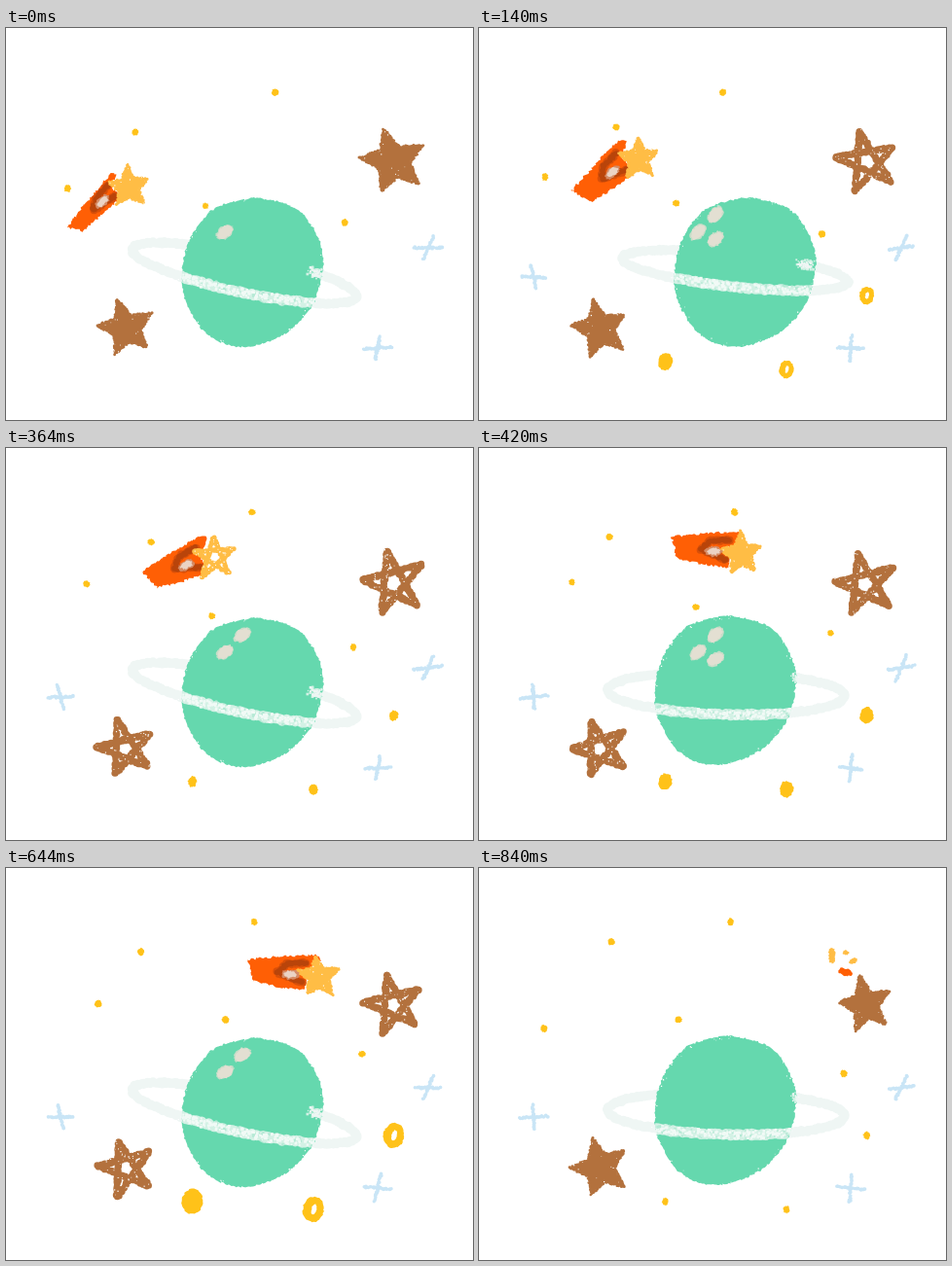
Animation of 480 by 403 pixels, one loop 980 ms. Source, as an HTML page with a canvas:

```html
<!DOCTYPE html>
<html lang="en">
<head>
<meta charset="utf-8">
<title>Crayon planet</title>
<style>
html, body { margin: 0; width: 100%; height: 100%; overflow: hidden; background: #fff; }
canvas { display: block; width: 480px; height: 403px; }
</style>
</head>
<body>
<canvas id="stage" width="480" height="403"></canvas>
<script>
const ctx = document.getElementById('stage').getContext('2d');
const STEP = 140, COUNT = 7;
const { sin, cos, abs, min, max, PI } = Math;
const MINT = '#65d8ae', RING = '#eff6f4', BROWN = '#b3713d', GOLD = '#ffc219',
      SKY = '#c9e5f6', FLAME = '#ff5f05', EMBER = '#b9440a', STAR = '#ffbd45', PALE = '#e3dfd2';

// Planet outline, shifted per pose; each ring is a tilted ellipse
const BODY = [[262,175], [297,185], [316,206], [326,235], [321,270], [308,295], [282,317],
              [243,328], [208,316], [185,282], [181,248], [190,215], [211,188], [236,178]];
const POSES = [
  { dx: 0, dy: 0, ring: { x: 245, y: 252, rx: 118, ry: 20, tilt: 12 } },
  { dx: 20, dy: 0, ring: { x: 263, y: 249, rx: 117, ry: 17, tilt: 6 } },
  { dx: 0, dy: -2, ring: { x: 254, y: 252, rx: 122, ry: 22, tilt: 1.5 } }
];
const POSE_ORDER = [0, 1, 0, 2, 0, 1, 2];

const SHINE_SPOTS = [[225,210], [243,192], [243,217]];
const SHINE_COUNT = [1, 3, 2, 3, 2, 1, 0];

// Small dots, each a path over the step number
const DOT_PATHS = [
  i => [257 + 20 * cos(i * 2 * PI / 3) * 0.65 ** i, 66 - max(0, 21 - 10.5 * abs(i - 5))],
  i => [141 + 9 * sin(i * 2 - 2), 107 - 5.2 * i],
  i => [80 - 17 * cos((i - 0.2) * PI / 3.25), 138 + 27 * cos(i * PI / 6) ** 4],
  i => [214 - 12 * cos((i - 0.7) * PI / 3), 168 + 15 * cos(i * PI / 5)],
  i => [348 + 4.5 * i, 200 + 12 * sin(i * 2 * PI / 4.6)]
];
const BLOB_SPOTS = [[398.5,275], [191.5,343], [316,351]];
const BLOB_SIZE = [0, 9, 5.5, 8.5, 13, 9.5, 4];

// x, y and lean of the upright stroke
const CROSSES = [[434,226,110], [382,329,100], [56,256,80]];
const COMET_PATH = [[126,164], [164,135], [214,113], [270,109], [321,112], [363,121]];

let seed = 1;
const rnd = () => (seed = seed * 16807 % 2147483647) / 2147483647;
const jit = a => (rnd() * 2 - 1) * a;
const mix = (a, b, t) => [a[0] + (b[0] - a[0]) * t, a[1] + (b[1] - a[1]) * t];
const polar = (x, y, r, deg) => [x + r * cos(deg * PI / 180), y + r * sin(deg * PI / 180)];

// Closed Catmull-Rom curve through the points
function smooth(pts) {
  const n = pts.length, out = [];
  for (let i = 0; i < n; i++) {
    const [a, b, c, d] = [n - 1, 0, 1, 2].map(k => pts[(i + k) % n]);
    for (let t = 0; t < 1; t += 0.125) {
      out.push([0, 1].map(k => b[k] + 0.5 * t * (c[k] - a[k] +
        t * (2 * a[k] - 5 * b[k] + 4 * c[k] - d[k] + t * (3 * (b[k] - c[k]) + d[k] - a[k])))));
    }
  }
  return out;
}

// Arc of a tilted ellipse, angles in degrees
function arc({ x, y, rx, ry, tilt }, from = 0, to = 360) {
  const c = cos(tilt * PI / 180), s = sin(tilt * PI / 180), out = [];
  for (let i = 0; i <= 32; i++) {
    const t = (from + (to - from) * i / 32) * PI / 180;
    const u = rx * cos(t), v = ry * sin(t);
    out.push([x + u * c - v * s, y + u * s + v * c]);
  }
  return out;
}

// Points along a polyline, about gap pixels apart
function walk(pts, gap) {
  const out = [];
  for (let i = 1; i < pts.length; i++) {
    const [a, b] = [pts[i - 1], pts[i]];
    const n = max(1, Math.round(Math.hypot(b[0] - a[0], b[1] - a[1]) / gap));
    for (let k = 0; k < n; k++) out.push(mix(a, b, k / n));
  }
  return [...out, pts[pts.length - 1]];
}

const close = pts => [...pts, pts[0]];

function rough(pts, color, wobble = 0.6) {
  ctx.fillStyle = color;
  ctx.beginPath();
  for (const [x, y] of walk(close(pts), 1.6)) ctx.lineTo(x + jit(wobble), y + jit(wobble));
  ctx.fill();
}

function crayon(pts, color, width, wobble = 0.7) {
  ctx.fillStyle = color;
  ctx.beginPath();
  for (const [x, y] of walk(pts, 1.2)) {
    const r = width / 2 * (0.85 + rnd() * 0.2), px = x + jit(wobble), py = y + jit(wobble);
    ctx.moveTo(px + r, py);
    ctx.arc(px, py, r, 0, 7);
  }
  ctx.fill();
}

// Small flecks scattered along a path
function flecks(pts, color, spread, count, size = 1) {
  const line = walk(pts, 1);
  ctx.fillStyle = color;
  for (let i = 0; i < count; i++) {
    const [x, y] = line[Math.floor(rnd() * line.length)];
    const s = size * (0.6 + rnd() * 0.7);
    ctx.fillRect(x + jit(spread) - s / 2, y + jit(spread) - s / 2, s, s);
  }
}

const blob = (x, y, rx, ry, tilt, color, wobble) => rough(arc({ x, y, rx, ry, tilt }), color, wobble);

// Hand-drawn five-pointed star, filled or as one looping line
function star(x, y, r, turn, color, solid, width) {
  const tips = [0, 1, 2, 3, 4].map(k => polar(x, y, r + jit(r * 0.07), turn - 90 + k * 72 + jit(4)));
  const line = [0, 2, 4, 1, 3, 0].map(k => tips[k]);
  if (solid) {
    const shape = tips.flatMap((p, k) => [p, mix([x, y], mix(p, tips[(k + 1) % 5], 0.5), 0.6)]);
    rough(shape, color, 0.9);
    crayon(close(shape), color, 3, 0.9);
  } else {
    crayon(line, color, width, 0.9);
  }
  flecks(line, '#fff', width / 2, solid ? r * 0.4 : r * 1.5);
}

function planet({ dx, dy, ring }) {
  const body = smooth(BODY.map(([x, y]) => [x + dx, y + dy]));
  const front = arc(ring, 20, 160), entry = arc(ring, -55, -48);
  crayon(arc(ring), RING, 10);
  rough(body, MINT, 0.9);
  flecks(close(body), '#fff', 3.5, 60);

  ctx.save();
  ctx.beginPath();
  body.forEach(p => ctx.lineTo(...p));
  ctx.clip();
  crayon(front, '#d3f1e5', 10.5, 1);
  flecks(front, '#b5e9d5', 4.6, 130, 2.2);
  flecks(front, '#f1faf6', 4, 300, 2.4);
  flecks(entry, '#d3f1e5', 5, 45, 2.2);
  flecks(entry, RING, 4, 30, 2.2);
  ctx.restore();
}

function shine(x, y) {
  const tilt = -38 + jit(12);
  blob(x, y, 10, 6.5, tilt, '#c8ddc8', 0.9);
  blob(x, y, 8.7, 5.5, tilt, PALE, 0.9);
}

function comet(i) {
  const [x, y] = COMET_PATH[i];
  const climb = max(0, 1 - i * i / 9);
  const size = i < 5 ? 1 : 0.62;
  const wide = min(36, 23 + 12 * i), shift = -4 - 7 * climb;
  const turn = (3 - 49 * climb) * PI / 180;
  // Along the flight, and across it as a share of the tail's width
  const place = ([u, v]) => {
    const a = u * size, b = (v * wide + shift) * size;
    return [x + a * cos(turn) - b * sin(turn), y + a * sin(turn) + b * cos(turn)];
  };
  const tail = [[-73,-0.28], [-40,-0.42], [-3,-0.52], [2,-0.36], [-12,0], [-13,0.52], [-42,0.46], [-66,0.32]];
  const ember = [[-13,-0.27], [-33,-0.22], [-42,0.04], [-16,0.3]].map(place);
  const glow = place([-29, 0.08]);
  rough(tail.map(place), FLAME, 1.3);
  crayon(ember, '#d94f08', 8 * size, 1);
  crayon(ember, EMBER, 5.5 * size, 1);
  star(x, y, 22 * size, -4, STAR, i !== 2, 5);
  const tilt = turn * 180 / PI;
  blob(...glow, 9 * size, 5 * size, tilt, '#d58a64', 1);
  blob(...glow, 6.5 * size, 3.5 * size, tilt, '#ebd3c4', 1);
}

// What is left once the comet has burst
function embers() {
  blob(363, 90, 3.6, 8, 0, STAR, 0.9);
  blob(377, 87, 3.2, 2.2, 15, STAR);
  blob(384.5, 95.5, 4.6, 2.8, -25, STAR);
  blob(376.5, 107, 7.5, 3.8, 15, FLAME, 0.8);
}

function cross([x, y, lean]) {
  for (const deg of [jit(9), lean + jit(7)]) {
    const half = 13.5 + jit(1.5);
    crayon([polar(x, y, -half, deg), polar(x, y, half, deg)], SKY, 3.8, 0.8);
  }
}

function dots(i) {
  for (const path of DOT_PATHS) blob(...path(i), 3.5 + jit(0.4), 3.5 + jit(0.4), 0, GOLD);
  const ry = BLOB_SIZE[i];
  if (!ry) return;
  BLOB_SPOTS.forEach(([x, y], k) => {
    blob(x, y, ry * 0.83, ry, 8, GOLD, 0.7);
    if (i % 3 === 1 && k !== 1) blob(x + 0.5, y, ry * 0.2, ry * 0.42, 12, '#fff', 0.4);
  });
}

function draw(i) {
  ctx.fillStyle = '#fff';
  ctx.fillRect(0, 0, 480, 403);
  const pose = POSE_ORDER[i];
  seed = (pose + 1) * 7654321;
  planet(POSES[pose]);
  seed = (i + 1) * 23456789;
  SHINE_SPOTS.slice(0, SHINE_COUNT[i]).forEach(p => shine(...p));
  CROSSES.slice(0, i ? 3 : 2).forEach(cross);
  dots(i);
  star(398, 137 + 0.7 * i, 34 - 0.8 * i, -13, BROWN, i % 6 === 0, 7);
  star(124, 309, 30, -15, BROWN, i < 2 || i === 6, 7);
  if (i < COMET_PATH.length) comet(i);
  else embers();
}

let shown = -1;
const start = performance.now();
function tick() {
  const i = Math.floor((performance.now() - start) / STEP) % COUNT;
  if (i !== shown) draw(shown = i);
  requestAnimationFrame(tick);
}
tick();
</script>
</body>
</html>
```
